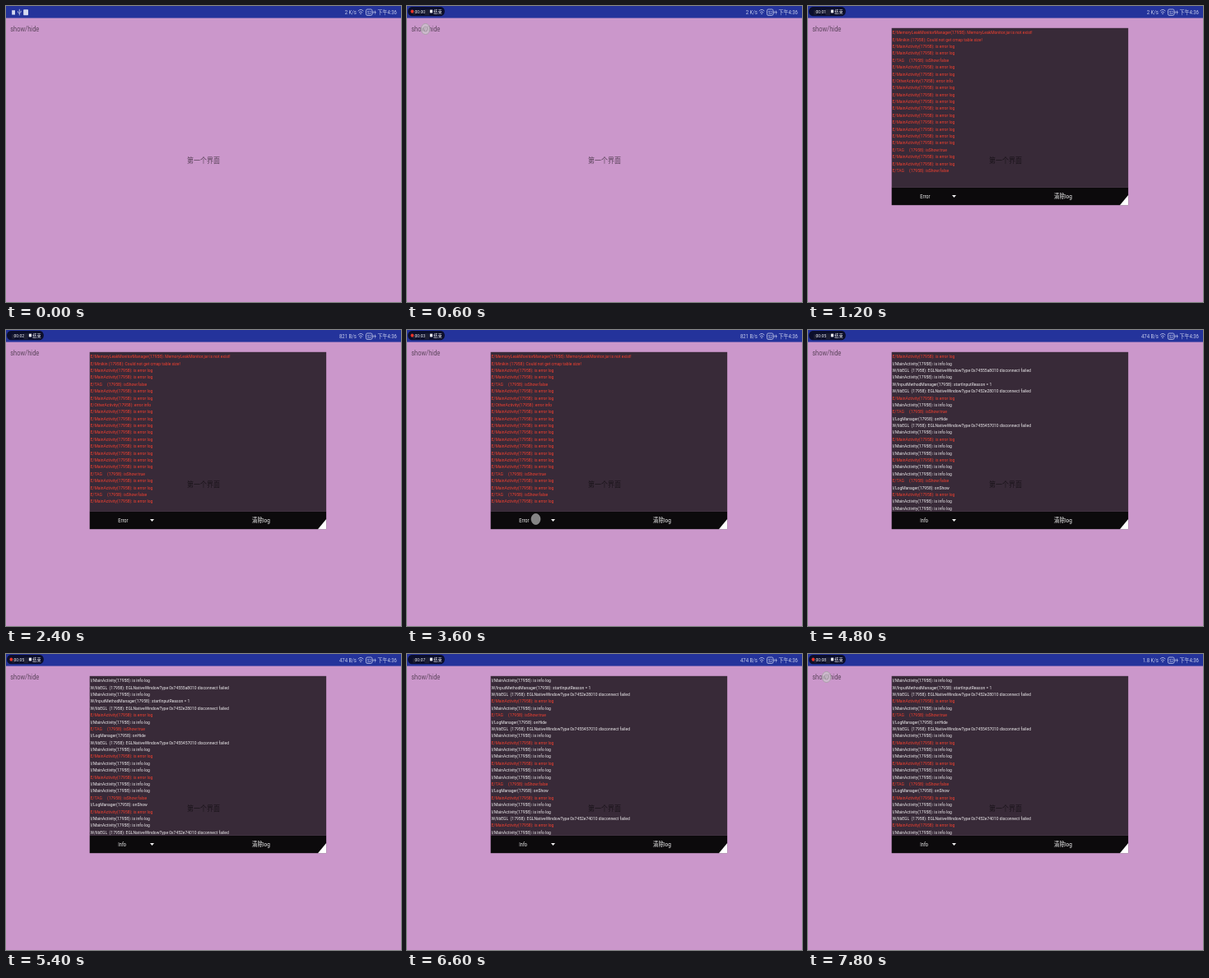
Write an HTML page that moves like this. It is 480 px wide and 360 px high and loops after 8000 ms.

```html
<!DOCTYPE html>
<html lang="zh-CN">
<head>
<meta charset="utf-8">
<title>Floating log window</title>
<style>
  html, body { margin: 0; width: 100%; height: 100%; overflow: hidden; background: #cb97cb; }
  svg { display: block; width: 480px; height: 360px; }
  text { font-family: Roboto, "Noto Sans CJK SC", "Noto Sans CJK", sans-serif; white-space: pre; }
  .page { fill: rgba(0, 0, 0, .54); }
  .bar { fill: #c3c9ea; font-size: 7.2px; }
  .pill { fill: #f4f4f8; font-size: 6.1px; }
  .foot { fill: #f2f2f2; }
  #log { font-size: 6px; }
</style>
</head>
<body>
<!-- A wide tablet screen shown at 4:3: the scene is 576 units across. -->
<svg viewBox="0 0 576 360" preserveAspectRatio="none">
  <rect width="576" height="360" fill="#cb97cb"/>
  <text class="page" x="6.3" y="30.8" font-size="9">show/hide</text>
  <text class="page" x="288" y="191.2" font-size="9.6" text-anchor="middle">第一个界面</text>

  <rect width="576" height="14.6" fill="#24339b"/>
  <g fill="#d5d9f0">
    <rect x="8.6" y="5.2" width="4.6" height="5.4"/>
    <rect x="25.4" y="4.2" width="7" height="7" rx=".8"/>
    <path d="M19.6 3.8v7.6M17.4 6.2v1.6l2.2 1.4M21.8 5.8v1.6l-2.2 1.4" fill="none" stroke="#d5d9f0" stroke-width=".8"/>
  </g>
  <text class="bar" id="speed" x="511" y="10.3" text-anchor="end"></text>
  <g fill="none" stroke="#c3c9ea" stroke-width=".9">
    <path d="M513.4 6.2q3.9-3.6 7.8 0M514.8 8q2.5-2.2 5 0M516.2 9.6q1.1-.9 2.2 0"/>
    <rect x="525" y="4" width="9" height="7.4" rx="1.8"/>
    <path d="M535.3 6.3v2.8"/>
  </g>
  <text class="bar" x="529.5" y="9.8" text-anchor="middle" style="font-size:5.6px">52</text>
  <path d="M538.6 4.8l-1.9 3.2h1.5l-.5 2.8 2.1-3.5h-1.5z" fill="#c3c9ea"/>
  <text class="bar" x="570" y="10.3" text-anchor="end">下午4:36</text>

  <g id="pill">
    <rect x="1.2" y="1" width="53.8" height="11.2" rx="5.6" fill="#080a20" fill-opacity=".9"/>
    <circle id="dot" cx="7.6" cy="6.6" r="2.2" fill="#f03428"/>
    <text class="pill" id="clock" x="11.4" y="8.7"></text>
    <rect x="33.4" y="4.6" width="3.8" height="3.8" fill="#f4f4f8"/>
    <text class="pill" x="38.8" y="8.8">结束</text>
  </g>

  <g id="win">
    <rect x="122" y="26.8" width="345" height="193.6" fill="#000" fill-opacity=".72"/>
    <rect x="122" y="220.4" width="345" height="21.8" fill="#0c0a0c"/>
    <g id="log"></g>
    <text class="foot" id="level" x="163.6" y="234" font-size="6.7"></text>
    <path d="M210 230h6l-3 3z" fill="#f2f2f2"/>
    <text class="foot" x="372" y="234.4" font-size="7.8" text-anchor="middle">清除log</text>
    <path d="M467 230v12.2h-12.2z" fill="#fff"/>
  </g>

  <g id="menu"></g>
  <g id="tap">
    <circle r="6.5" fill="#d0d0d0" fill-opacity=".62" stroke="#a0a0a0" stroke-opacity=".8"/>
    <circle r="3" fill="none" stroke="#888" stroke-opacity=".5" stroke-width="1.2"/>
  </g>
</svg>
<script>
const LOOP = 8000, STEP = 600, ROWS = 23, PITCH = 8.39;
const $ = id => document.getElementById(id);

const egl = addr => `W/libEGL  (17958): EGLNativeWindowType 0x${addr} disconnect failed`;
const LINES = {
  K: 'E/MemoryLeakMonitorManager(17958): MemoryLeakMonitor.jar is not exist!',
  M: 'E/Minikin (17958): Could not get cmap table size!',
  O: 'E/OtherActivity(17958): error info',
  E: 'E/MainActivity(17958): is error log',
  I: 'I/MainActivity(17958): is info log',
  T: 'E/TAG     (17958): isShow:true',
  F: 'E/TAG     (17958): isShow:false',
  H: 'I/LogManager(17958): onHide',
  S: 'I/LogManager(17958): onShow',
  R: 'W/InputMethodManager(17958): startInputReason = 1',
  a: egl('74555a8010'),
  b: egl('7452e28010'),
  c: egl('7455457010'),
  d: egl('7452e74010')
};
const ERRORS = 'KMEEFEEOEEEEEEEEETEEFE';
const INFOS = 'EIaIRbEITHcIEIIEIIFSEIIdEI';
const SECONDS = [0, 0, 1, 1, 2, 3, 3, 4, 5, 5, 6, 7, 7, 8];
const DOT_ON = [1, 3, 6, 9, 12, 13];
const TAPS = { 1: [27, 28], 6: [187.8, 230], 13: [27, 28] };

function add(parent, tag, attrs, text = '') {
  const el = document.createElementNS('http://www.w3.org/2000/svg', tag);
  for (const key in attrs) el.setAttribute(key, attrs[key]);
  el.textContent = text;
  parent.append(el);
  return el;
}

const show = (id, on) => $(id).setAttribute('visibility', on ? 'visible' : 'hidden');

const rows = Array.from({ length: ROWS }, (_, i) =>
  add($('log'), 'text', { x: 123, y: 34.2 + i * PITCH }));

add($('menu'), 'rect', { x: 159, y: 243, width: 62, height: 74, fill: '#0c0a0c' });
['Verbose', 'Debug', 'Info', 'Warn', 'Error'].forEach((name, i) =>
  add($('menu'), 'text', { class: 'foot', x: 163.6, y: 252.8 + i * 14.8, 'font-size': 6.7 }, name));

function visibleLog(step) {
  if (step < 8) return ERRORS.slice(0, step < 3 ? -1 : undefined);
  const end = step < 9 ? 23 : step < 10 ? 24 : 26;
  return INFOS.slice(end - ROWS, end);
}

function render(step) {
  const log = visibleLog(step);
  rows.forEach((row, i) => {
    const line = LINES[log[i]] || '';
    row.textContent = line;
    row.setAttribute('fill', line[0] === 'E' ? '#f5402f' : '#f0eef0');
  });
  $('level').textContent = step < 8 ? 'Error' : 'Info';
  $('speed').textContent = step < 3 ? '2 K/s' : step < 8 ? '821 B/s' : step < 13 ? '474 B/s' : '1.8 K/s';
  $('clock').textContent = `00:0${SECONDS[step]}`;
  show('pill', step > 0);
  show('dot', DOT_ON.includes(step));
  show('win', step > 1);
  show('menu', step === 7);
  show('tap', step in TAPS);
  if (step in TAPS) $('tap').setAttribute('transform', `translate(${TAPS[step]})`);
}

let last = -1;
function tick() {
  const step = Math.floor(performance.now() % LOOP / STEP);
  if (step !== last) render(last = step);
  requestAnimationFrame(tick);
}
tick();
</script>
</body>
</html>
```
